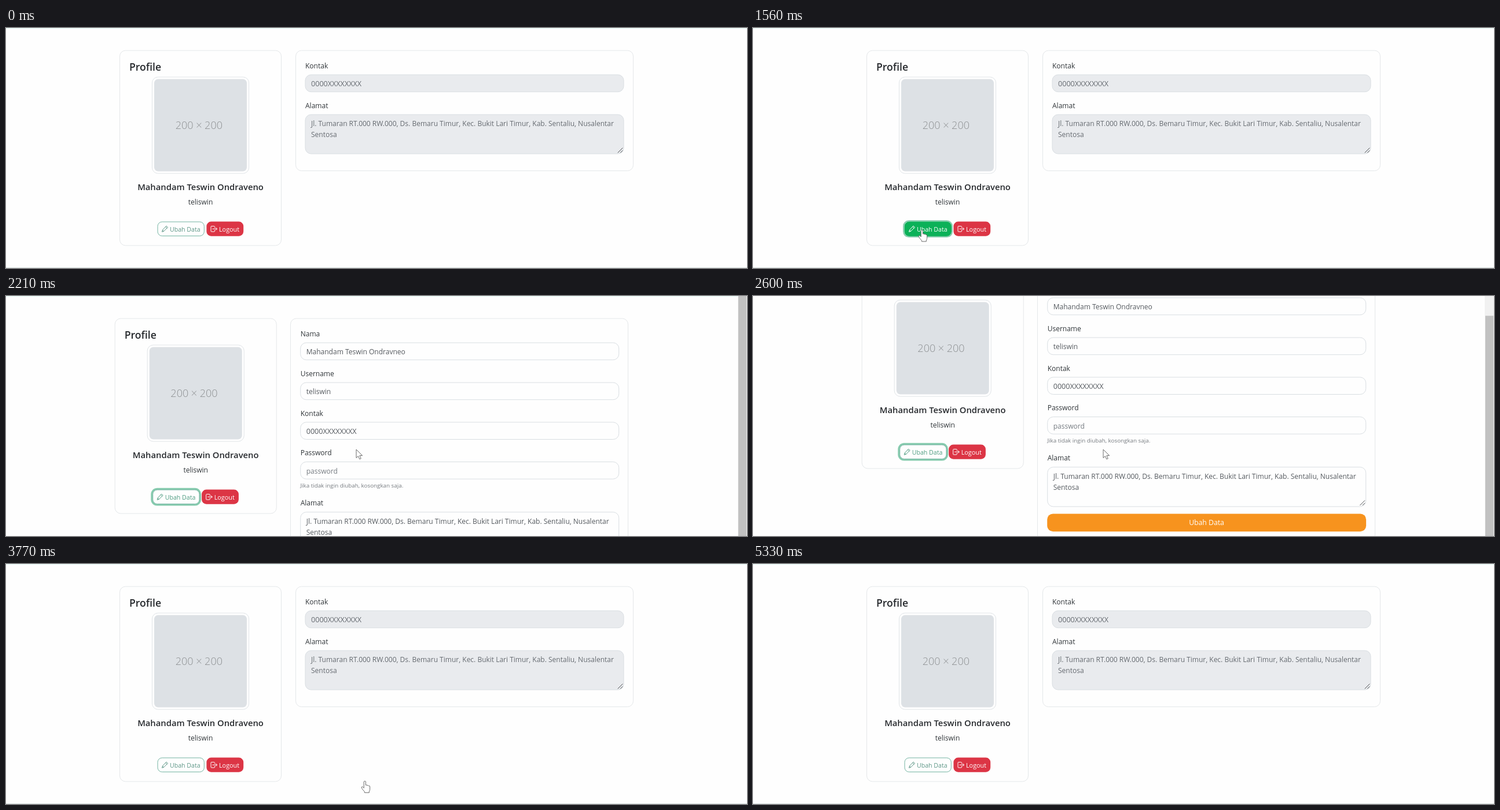
These frames come from a looping animation (1280x416 px, 5460 ms). An HTML page:

```html
<!DOCTYPE html>
<html lang="id">
<head>
<meta charset="utf-8">
<title>Profile</title>
<style>
  html, body { margin: 0; width: 100%; height: 100%; overflow: hidden; background: #fefefe; }
  svg { display: block; width: 100%; height: 100%; }
  text { font-family: "Open Sans", "Noto Sans", sans-serif; white-space: pre; }
</style>
</head>
<body>
<svg id="stage" viewBox="0 0 1280 416">
  <rect width="1280" height="416" fill="#fefefe"/>
  <g id="page"></g>
  <g id="scrollbar">
    <rect x="1264" width="16" height="416" fill="#f1f1f1"/>
    <rect id="thumb" x="1265" width="14" height="600" fill="#c1c1c1"/>
  </g>
  <g id="cursor" fill="#fff" stroke="#6a6a6a" stroke-linejoin="round">
    <path id="arrow" d="M0 0V14.6L3.4 11.5 5.8 16.8 8.2 15.7 5.9 10.6H10.6Z"/>
    <path id="hand" d="M-1.8 12V1.6a1.6 1.6 0 0 1 3.2 0V7q1.6-1 2.6.6 1.8-.8 2.6.7 2-.5 2 1.6v4.5q0 2-1.3 3.4V20H-.6v-1.6q-3-3-5-6.4-.8-2 .8-2.3 1.4 0 3 2.3z"/>
  </g>
</svg>
<script>
const LOOP = 5460, STEP = 130;
const OPEN_FORM = 1690, CLOSE_FORM = 3640, MAX_SCROLL = 94.5;
const NAME = "Mahandam Teswin Ondraveno";
const USER = "teliswin";
const PHONE = "0000XXXXXXXX";
const ADDRESS = [
  "Jl. Tumaran RT.000 RW.000, Ds. Bemaru Timur, Kec. Bukit Lari Timur, Kab. Sentaliu, Nusalentar",
  "Sentosa"
];

const $ = id => document.getElementById(id);

function add(parent, tag, attrs, content) {
  const node = document.createElementNS("http://www.w3.org/2000/svg", tag);
  for (const key in attrs) node.setAttribute(key, attrs[key]);
  if (content) node.textContent = content;
  return parent.appendChild(node);
}
const group = (parent, attrs = {}) => add(parent, "g", attrs);
const box = (parent, x, y, width, height, rx, fill, stroke = "none") =>
  add(parent, "rect", { x, y, width, height, rx, fill, stroke });
const label = (parent, x, y, size, fill, content, extra = {}) =>
  add(parent, "text", { x, y, "font-size": size, fill, ...extra }, content);
const icon = (parent, x, y, d) =>
  add(parent, "path", { d, transform: `translate(${x} ${y})`, fill: "none", "stroke-linejoin": "round", "stroke-linecap": "round" });
const middle = { "text-anchor": "middle" };

const INK = "#2f3438", LINE = "#e4e7e9";
const page = $("page");
const topLine = box(page, 0, 0, 1280, 1, 0, "#e3faf5");

// Profile card
const profile = group(page);
box(profile, 196.5, 39, 279, 338, 10, "#fefefe", LINE);
label(profile, 213, 74, 17.6, "#26292d", "Profile", { "font-weight": 600 });
box(profile, 252.5, 85, 167, 167, 10, "#fff", "#e0e4e7");
box(profile, 256, 88.5, 160, 160, 7, "#dde1e5");
label(profile, 333.3, 175, 18, "#8f9294", "200 × 200", { ...middle, "font-weight": 300 });
label(profile, 336, 281, 14.8, "#26292d", NAME, { ...middle, "font-weight": 600 });
label(profile, 336, 305.5, 12, INK, USER, middle);

const ring = box(profile, 260.2, 334.4, 83.6, 27.6, 9, "none", "#86cbae");
const editButton = box(profile, 262, 336, 80.3, 24.4, 7.5, "#fefefe");
const editFace = [
  icon(profile, 269, 342.5, "M8.2.8 10.4 3 3.4 9.9.5 10.8 1.4 7.9ZM6.8 2.2 9 4.4M1.6 8 3.3 9.7"),
  label(profile, 283, 352.5, 10.6, "", "Ubah Data")
];
box(profile, 346.4, 335.6, 63.8, 25.1, 8, "#dc3545");
icon(profile, 353.5, 343, "M7 3V1.5Q7 .5 6 .5H1.5Q.5.5.5 1.5V9Q.5 10 1.5 10H6Q7 10 7 9V7.5M3.5 5.2H11M8.8 3 11 5.2 8.8 7.4").setAttribute("stroke", "#fff");
label(profile, 368, 352.5, 10.8, "#fff", "Logout");

// Fields share a left edge; text sits 10px inside
function field(parent, x, y, title, lines, { fill = "#fefefe", color = "#555a5f", height = 29.7, size = 12 } = {}) {
  label(parent, x, y - 11.2, 12, INK, title);
  box(parent, x, y, 550, height, 10, fill, "#d9dee2");
  lines.forEach((line, i) => label(parent, x + 10, y + 20 + i * 19.2, size, color, line));
  if (height > 30) icon(parent, x + 540, y + 58, "M0 8 8 0M4.5 8 8 4.5").setAttribute("stroke", "#4d5053");
}

// Read-only details
const view = group(page);
const locked = { fill: "#e9ebee", color: "#666b71" };
box(view, 500.5, 39, 583, 208.5, 10, "#fefefe", LINE);
field(view, 517, 81, "Kontak", [PHONE], { ...locked, size: 12.6 });
field(view, 517, 150, "Alamat", ADDRESS, { ...locked, height: 68 });
box(view, 0, 415, 1280, 1, 0, "#d6dfdd");

// Edit form
const form = group(page);
box(form, 491.5, 39, 583, 463.5, 10, "#fefefe", LINE);
field(form, 508.7, 81, "Nama", [NAME.replace("veno", "vneo")]);
field(form, 508.7, 150, "Username", [USER]);
field(form, 508.7, 218.8, "Kontak", [PHONE], { size: 12.6 });
field(form, 508.7, 287.5, "Password", ["password"], { color: "#757b81" });
label(form, 508.5, 332.3, 9.8, "#74797e", "Jika tidak ingin diubah, kosongkan saja.");
field(form, 508.7, 374.6, "Alamat", ADDRESS, { height: 68.4 });
const submit = box(form, 508.2, 455.4, 550.9, 30.9, 10, "#f7931e");
label(form, 783.5, 475.2, 12.2, "#fff", "Ubah Data", middle);

// Time followed by values, linear in between
const pointer = [
  [260, 440, 408], [520, 352, 372], [780, 300, 352], [1170, 292, 350], [1690, 292, 350],
  [1950, 480, 300], [2210, 605, 266], [2860, 605, 266], [3250, 620, 376.3], [3770, 620, 376.3],
  [4030, 560, 366], [4680, 80, 366], [4940, 41, 379], [5200, 41, 379]
];
const scrolling = [[2340, 0], [2470, 34], [2600, 78], [2730, MAX_SCROLL]];

function track(keys, t) {
  if (t <= keys[0][0]) return keys[0].slice(1);
  const next = keys.findIndex(key => key[0] > t);
  if (next < 0) return keys[keys.length - 1].slice(1);
  const a = keys[next - 1], b = keys[next];
  const k = (t - a[0]) / (b[0] - a[0]);
  return a.slice(1).map((v, i) => v + (b[i + 1] - v) * k);
}
const between = (t, from, to) => t >= from && t < to;
const show = (node, on) => node.setAttribute("display", on ? "inline" : "none");

function draw(t) {
  const editing = between(t, OPEN_FORM, CLOSE_FORM);
  const [scroll] = editing ? track(scrolling, t) : [0];
  page.setAttribute("transform", `translate(0 ${-scroll})`);
  profile.setAttribute("transform", `translate(${editing ? -8.3 : 0} 0)`);
  topLine.setAttribute("width", editing ? 1264 : 1280);
  show(view, !editing);
  show(form, editing);
  show($("scrollbar"), editing);
  $("thumb").setAttribute("y", -32 + 0.85 * scroll);

  const hoverEdit = between(t, 780, 1820);
  const focused = between(t, 1430, CLOSE_FORM);
  const tint = hoverEdit ? "#fff" : focused ? "#4f9d82" : "#5d9787";
  show(ring, focused);
  ring.setAttribute("stroke-width", hoverEdit ? 2.2 : 3.2);
  editButton.setAttribute("fill", hoverEdit ? "#0bb158" : "#fefefe");
  editButton.setAttribute("stroke", hoverEdit ? "#0bb158" : "#72b3a1");
  editFace[0].setAttribute("stroke", tint);
  editFace[1].setAttribute("fill", tint);

  const hoverSubmit = between(t, 3250, CLOSE_FORM);
  submit.setAttribute("fill", hoverSubmit ? "#e67f06" : "#f7931e");

  const pointing = hoverEdit || between(t, 3250, 3900);
  const [x, y] = track(pointer, t);
  $("cursor").setAttribute("transform", `translate(${x} ${y})`);
  show($("cursor"), between(t, 260, 5200));
  show($("hand"), pointing);
  show($("arrow"), !pointing);
}

const start = performance.now();
function tick() {
  const t = (performance.now() - start) % LOOP;
  draw(Math.floor(t / STEP) * STEP);
  requestAnimationFrame(tick);
}
tick();
</script>
</body>
</html>
```
